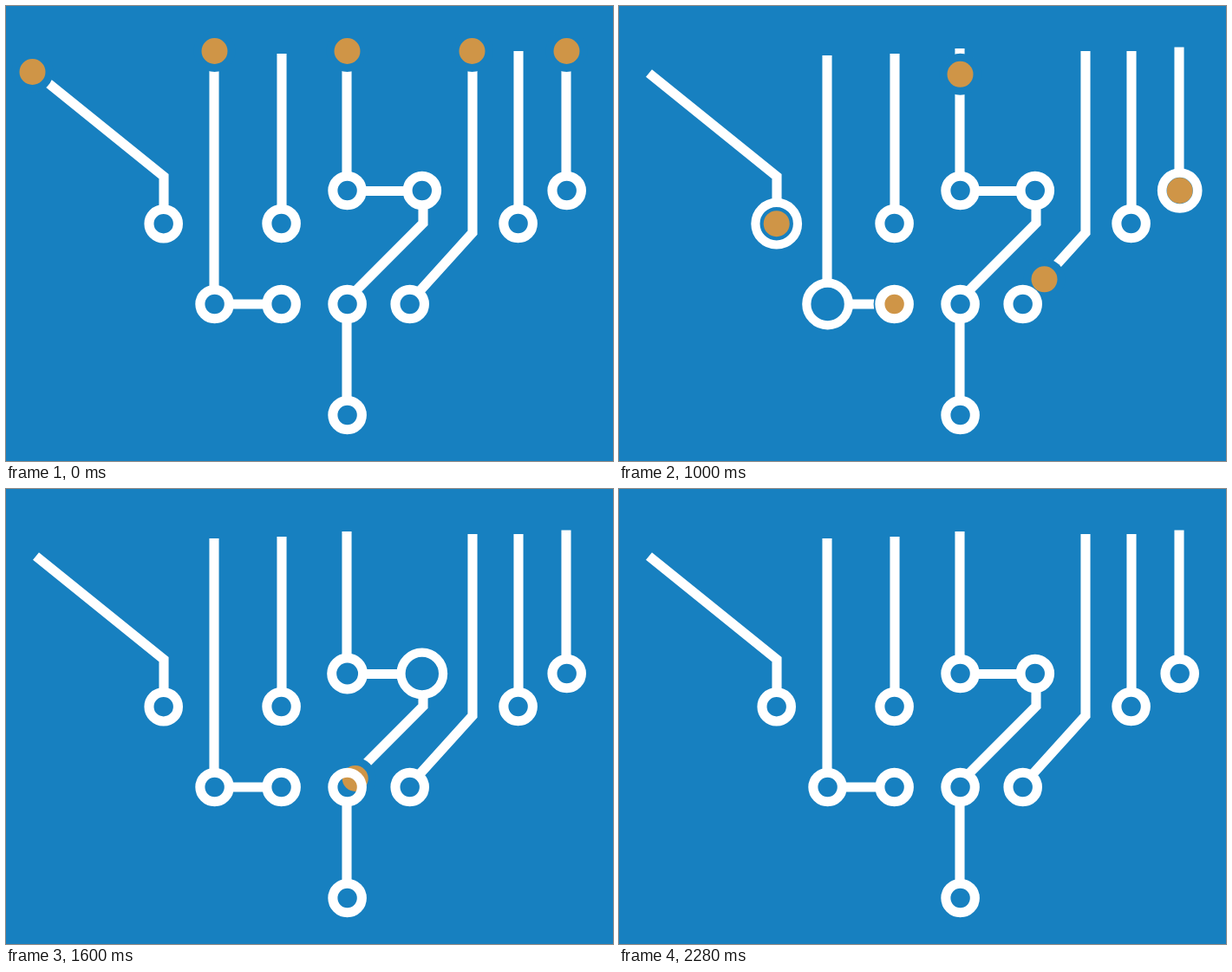
Write an HTML page with a canvas that moves like this. It is 700x525 px and loops after 3800 ms.

```html
<!DOCTYPE html>
<html lang="en">
<head>
<meta charset="utf-8">
<title>Circuit</title>
<style>
  html, body { margin: 0; width: 100%; height: 100%; overflow: hidden; background: #1780c0; }
  canvas { display: block; }
</style>
</head>
<body>
<canvas id="stage" width="700" height="525"></canvas>
<script>
const ctx = document.getElementById('stage').getContext('2d');
const LOOP = 3800, STEP = 40, PULSE = 160;
const BLUE = '#1780c0', WHITE = '#fff', GOLD = '#cf9547';

const wires = new Path2D(`
  M34.5 77.5 L182 196.7 V240
  M240 57 V335 M250 344 H308
  M318 55 V240
  M393 49 V203 M403 213.5 H470
  M481 223 V250.6 L396 336 M393 354 V462
  M538 52 V261.5 L468 339
  M591 52 V240
  M646 47.5 V203`);

// A ring swells at `grow`, holds, then shrinks back; without a time it rests.
const ring = (x, y, grow = Infinity, hold = PULSE) =>
  ({ x, y, grow, shrink: grow + PULSE + hold });

const slant = ring(181.7, 251.2, 800, 120);
const low = ring(240.6, 344, 840);
const lowEnd = ring(317.6, 344, 1000);
const mid = ring(393.6, 213, 1160);
const midSide = ring(479.8, 213, 1320);
const hub = ring(393.6, 344, 1600);
const tail = ring(393.6, 472, 1800);
const bend = ring(465.7, 344, 1040);
const short = ring(646.7, 213, 920);
const rings = [slant, low, lowEnd, mid, midSide, hub, tail, bend, short,
               ring(317.6, 251), ring(590.6, 251)];

// Each leg is covered at an even speed; the dot fades with its last ring.
const at = (x, y) => ({ x, y });
const leg = (start, end, ...points) => ({ start, end, points });
const dots = [
  [leg(400, 812, at(30.5, 76), at(181.5, 197), slant)],
  [leg(480, 840, at(240.5, 52), low), leg(840, 1000, low, lowEnd)],
  [leg(960, 1200, at(393.5, 52), mid),
   leg(1240, 1815, mid, midSide, at(479.5, 250), hub, tail)],
  [leg(600, 1054, at(537.5, 52), at(537.5, 261), bend)],
  [leg(600, 960, at(646.5, 52), short)]
];

const lerp = (a, b, k) => a + (b - a) * k;
const clamp = k => Math.min(1, Math.max(0, k));
const span = (a, b) => Math.hypot(b.x - a.x, b.y - a.y);

function ease(t, start) {
  const k = clamp((t - start) / PULSE);
  return k * k * (3 - 2 * k);
}

function along(points, k) {
  const lengths = points.slice(1).map((p, i) => span(points[i], p));
  let rest = k * lengths.reduce((a, b) => a + b);
  let i = 0;
  while (i < lengths.length - 1 && rest > lengths[i]) rest -= lengths[i++];
  const a = points[i], b = points[i + 1], part = rest / lengths[i];
  return at(lerp(a.x, b.x, part), lerp(a.y, b.y, part));
}

function disc(x, y, r, color) {
  ctx.fillStyle = color;
  ctx.beginPath();
  ctx.arc(x, y, r, 0, Math.PI * 2);
  ctx.fill();
}

function drawDot(legs, t) {
  const scale = 1 - ease(t, legs.at(-1).points.at(-1).shrink);
  if (scale <= 0) return;
  const { start, end, points } = legs.findLast(l => t >= l.start) || legs[0];
  const { x, y } = along(points, clamp((t - start) / (end - start)));
  disc(x, y, 24 * scale, BLUE);
  disc(x, y, 15 * scale, GOLD);
}

function drawRing({ x, y, swell }) {
  ctx.lineWidth = lerp(11.1, 10.2, swell);
  ctx.beginPath();
  ctx.arc(x, y, lerp(16.75, 24.3, swell), 0, Math.PI * 2);
  ctx.stroke();
}

function draw(t) {
  ctx.fillStyle = BLUE;
  ctx.fillRect(0, 0, 700, 525);
  ctx.strokeStyle = WHITE;
  ctx.lineWidth = 11.1;
  ctx.stroke(wires);

  for (const r of rings) {
    r.swell = ease(t, r.grow) - ease(t, r.shrink);
    disc(r.x, r.y, lerp(13, 21, r.swell), BLUE);
  }
  dots.forEach(legs => drawDot(legs, t));
  rings.forEach(drawRing);
}

const origin = performance.now();
function frame() {
  const t = (performance.now() - origin) % LOOP;
  draw(Math.floor(t / STEP) * STEP);
  requestAnimationFrame(frame);
}
frame();
</script>
</body>
</html>
```
